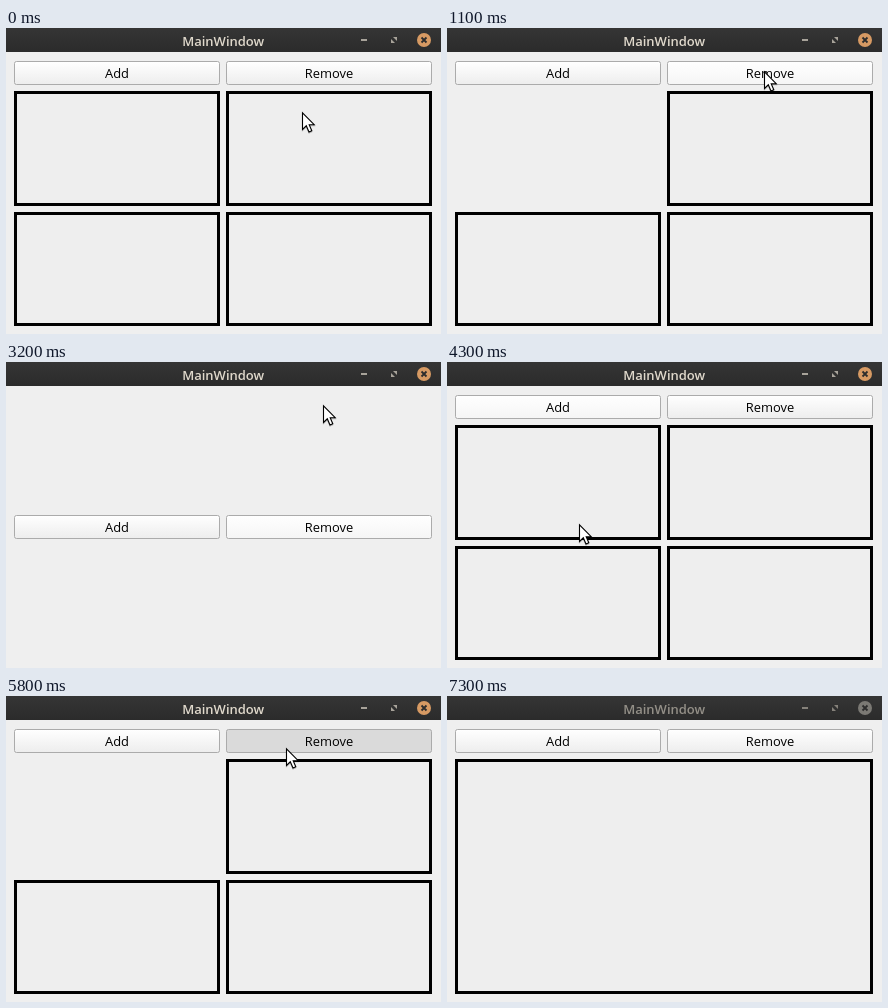
These frames come from a looping animation (435x306 px, 7400 ms). An HTML page:

```html
<!DOCTYPE html>
<html lang="en">
<head>
<meta charset="utf-8">
<title>Window</title>
<style>
  html, body { margin: 0; width: 100%; height: 100%; overflow: hidden; background: #efefef; }
  svg { display: block; width: 435px; height: 306px; }
  text { font-family: "Open Sans", "Noto Sans", sans-serif; text-anchor: middle; }
  #title { font-size: 13px; font-weight: 600; fill: #dfd8cb; }
  #icons { fill: #a8a39a; }
  #close { fill: #d79a63; }
  .idle #title { fill: #938f87; }
  .idle #icons { fill: #85817a; }
  .idle #close { fill: #7b7974; }
  .button rect { fill: url(#normal); stroke: #ababab; }
  .button text { font-size: 12.9px; fill: #000; }
  .button.hover rect { fill: url(#hover); }
  .button.pressed rect { fill: #dadada; }
  #boxes rect { fill: #eee; stroke: #000; stroke-width: 3; }
</style>
</head>
<body>
<svg id="stage" viewBox="0 0 435 306">
  <defs>
    <linearGradient id="bar" x2="0" y2="1">
      <stop stop-color="#353535"/><stop offset="1" stop-color="#2b2b2b"/>
    </linearGradient>
    <linearGradient id="normal" x2="0" y2="1">
      <stop stop-color="#fff"/><stop offset="1" stop-color="#ededed"/>
    </linearGradient>
    <linearGradient id="hover" x2="0" y2="1">
      <stop stop-color="#fff"/><stop offset="1" stop-color="#f5f5f5"/>
    </linearGradient>
  </defs>

  <rect width="435" height="306" fill="#efefef"/>
  <rect width="435" height="24" fill="url(#bar)"/>
  <text id="title" x="217.2" y="18">MainWindow</text>
  <g id="icons">
    <rect x="355" y="11" width="6" height="2"/>
    <path d="M387 9h4v4zM385 11v4h4z"/>
  </g>
  <circle id="close" cx="418" cy="12" r="7"/>
  <path d="M415.5 9.5l5 5m0-5l-5 5" stroke="#2d2d2d" stroke-width="1.8"/>

  <g id="buttons">
    <g id="add" class="button">
      <rect x="8.5" y="33.5" width="205" height="23" rx="2"/>
      <text x="111" y="50">Add</text>
    </g>
    <g id="remove" class="button">
      <rect x="220.5" y="33.5" width="205" height="23" rx="2"/>
      <text x="323" y="50">Remove</text>
    </g>
  </g>
  <g id="boxes"></g>
  <path id="cursor" d="M.5 .8V17.4L4.3 13.8L7 20L9.8 18.8L7.2 12.7H12.2Z"
        fill="#fff" stroke="#000" stroke-width="1.1"
        style="filter: drop-shadow(.5px 1px .5px rgba(0,0,0,.25))"/>
</svg>
<script>
const LOOP = 7400, TICK = 100;
const $ = id => document.getElementById(id);

// Boxes as [left, top, right, bottom], indexed by how many are shown.
const topLeft = [8, 63, 214, 178], topRight = [220, 63, 426, 178];
const lowLeft = [8, 184, 214, 298], lowRight = [220, 184, 426, 298];
const layouts = [
  [],
  [[8, 63, 426, 298]],
  [[8, 63, 214, 298], [220, 63, 426, 298]],
  [topRight, lowLeft, lowRight],
  [topLeft, topRight, lowLeft, lowRight]
];

// [start time, box count]
const counts = [[0, 4], [1100, 3], [1800, 2], [2600, 1], [3200, 0],
                [4300, 4], [5400, 3], [5900, 2], [6400, 1]];

// [start time, ticks, x, y]
const moves = [[100, 2, 304, 74], [700, 2, 317, 43], [3600, 6, 132, 162],
               [4700, 5, 280, 52], [6800, 3, 30, 0]];

const presses = [1000, 2500, 5800];
const within = (t, from, to) => t >= from && t < to;
const smooth = p => p * p * (3 - 2 * p);

function cursorAt(t) {
  let x = 296, y = 84;
  for (const [start, ticks, toX, toY] of moves) {
    if (t < start) break;
    const p = smooth(Math.min(1, ((t - start) / TICK + 1) / ticks));
    x += (toX - x) * p;
    y += (toY - y) * p;
  }
  return [Math.round(x), Math.round(y)];
}

function boxMarkup([left, top, right, bottom]) {
  return `<rect x="${left + 1.5}" y="${top + 1.5}" width="${right - left - 3}" height="${bottom - top - 3}"/>`;
}

let shownCount = -1;
function showBoxes(count) {
  if (count === shownCount) return;
  shownCount = count;
  $("boxes").innerHTML = layouts[count].map(boxMarkup).join("");
  $("buttons").setAttribute("transform", `translate(0 ${count ? 0 : 120})`);
}

function draw(t) {
  showBoxes(counts.findLast(([start]) => t >= start)[1]);
  $("cursor").setAttribute("transform", `translate(${cursorAt(t)})`);
  $("cursor").setAttribute("visibility", t < 7100 ? "visible" : "hidden");
  $("add").classList.toggle("hover", within(t, 4000, 4700));
  $("remove").classList.toggle("hover", within(t, 800, 4000) || within(t, 5100, 6800));
  $("remove").classList.toggle("pressed", presses.some(at => within(t, at, at + TICK)));
  $("stage").classList.toggle("idle", t >= 7300);
}

const begin = performance.now();
function frame() {
  const t = (performance.now() - begin) % LOOP;
  draw(Math.floor(t / TICK) * TICK);
  requestAnimationFrame(frame);
}
frame();
</script>
</body>
</html>
```
